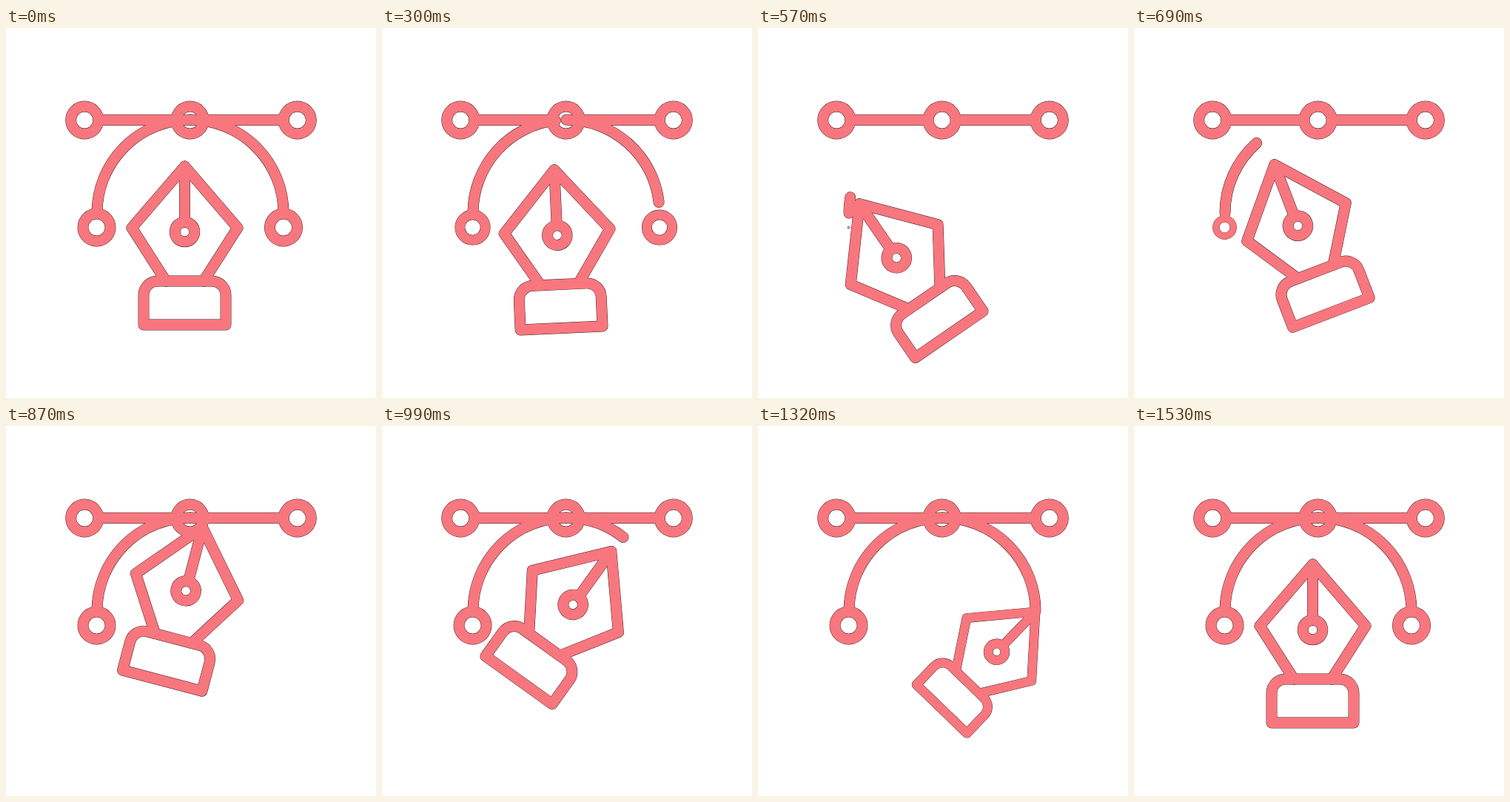
An HTML page for the animation above (1.83 s loop, 500 px wide and 500 px high).

```html
<!DOCTYPE html>
<html lang="en">
<head>
<meta charset="utf-8">
<title>Pen tool</title>
<style>
  html, body { margin: 0; width: 100%; height: 100%; overflow: hidden; background: #fff; }
  svg { display: block; width: 100vw; height: 100vh; }
</style>
</head>
<body>
<svg id="stage" viewBox="0 0 500 500" fill="none" stroke-linecap="round" stroke-linejoin="round"></svg>
<script>
const LOOP = 1830, STEP = 30;
const PINK = '#f8777f', EDGE = '#33191b';
const stage = document.getElementById('stage');

const clamp = x => Math.min(1, Math.max(0, x));
const part = (t, a, b) => clamp((t - a) / (b - a));
const smooth = u => u * u * (3 - 2 * u);
const mix = (a, b, u) => a + (b - a) * u;

// Keys are [time, value, eased?]; the flag eases the stretch that ends there.
function track(t, keys) {
  let value = keys[0][1];
  for (let i = 1; i < keys.length && t > keys[i - 1][0]; i++) {
    const [end, to, eased] = keys[i];
    const u = part(t, keys[i - 1][0], end);
    value = mix(keys[i - 1][1], to, eased ? smooth(u) : u);
  }
  return value;
}

const tipX = [[270, 241.5], [450, 124, 1], [540, 124], [825, 249], [1110, 354], [1212, 375], [1350, 375], [1530, 241.5, 1]];
const tipY = [[270, 187], [450, 251, 1], [540, 251], [825, 125], [1110, 202], [1212, 251], [1350, 251], [1530, 187, 1]];
const turn = [[270, 0], [450, -35.3, 1], [536, -35.3], [1104, 44, 1], [1350, 44], [1530, 0, 1]];
const press = [[450, 1], [495, 0.78], [540, 1], [1260, 1], [1305, 0.78], [1350, 1]];
const leftArc = [[270, 90], [450, 0, 1], [540, 0], [818, 90]];
const rightArc = [[270, 90], [450, 0, 1], [830, 0], [1212, 90]];
const leftDot = [[270, 1], [450, 0, 1], [555, 0], [770, 1]];
const rightDot = [[270, 1], [450, 0, 1], [1350, 0], [1530, 1]];

function ring(x, y, s = 1) {
  return s < 0.01 ? '' : `<circle r="18.5" transform="translate(${x} ${y}) scale(${s})"/>`;
}

// Clockwise arc of the curve; angles in degrees, 0 at the far left.
function arc(from, sweep) {
  if (sweep < 0.1) return '';
  const at = deg => {
    const a = deg * Math.PI / 180;
    return `${249 - 126 * Math.cos(a)} ${250 - 126 * Math.sin(a)}`;
  };
  return `<path d="M${at(from)}A126 126 0 0 1 ${at(from + sweep)}"/>`;
}

// Nib with its tip at the local zero point.
const nib = `
  <path d="M-25.5 155L-71.5 83L0 0L71.5 83L25.5 155"/>
  <path d="M0 0V75"/>
  <circle cy="88.5" r="13.3"/>
  <path d="M-55.5 214V174a19 19 0 0 1 19-19H36.5a19 19 0 0 1 19 19V214Z"/>`;

function draw(t) {
  const pose = `translate(${track(t, tipX)} ${track(t, tipY)}) rotate(${track(t, turn)}) scale(${track(t, press)})`;
  const shapes = `
    <path stroke-linecap="butt" d="M124 124.3H231M266 124.3H376"/>
    ${arc(0, track(t, leftArc))}${arc(90, track(t, rightArc))}
    ${ring(106.2, 124.5)}${ring(248.6, 124.5)}${ring(393.8, 124.5)}
    ${ring(122.5, 269.5, track(t, leftDot))}${ring(375, 269.5, track(t, rightDot))}
    <g transform="${pose}">${nib}</g>`;
  stage.innerHTML =
    `<g stroke="${EDGE}" stroke-width="14.9">${shapes}</g>` +
    `<g stroke="${PINK}" stroke-width="14">${shapes}</g>`;
}

const start = performance.now();
let last = -1;
function tick() {
  const now = (performance.now() - start) % LOOP;
  let t = Math.floor(now / STEP) * STEP;
  if (t < 300) t = 0;
  if (t !== last) draw(last = t);
  requestAnimationFrame(tick);
}
tick();
</script>
</body>
</html>
```
